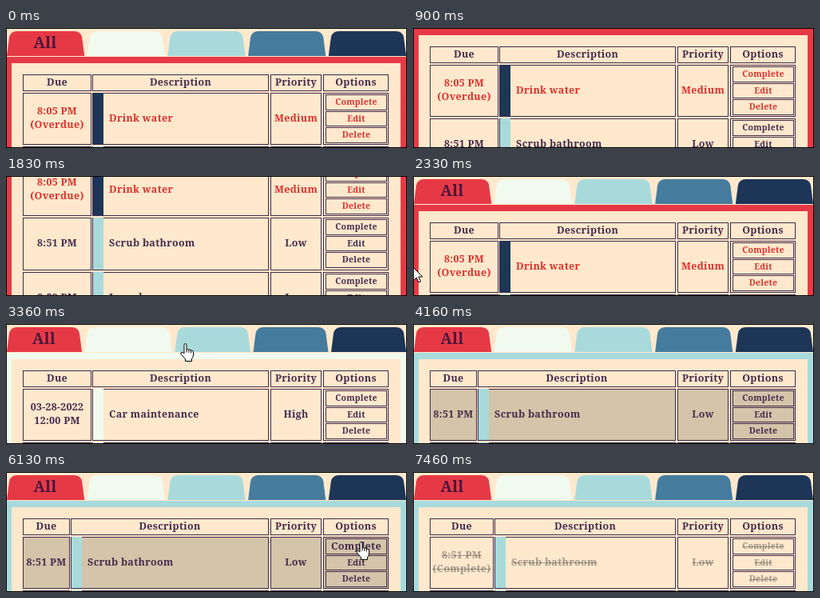
These frames come from a looping animation (502 by 150 pixels, 8.96 s). An HTML page with a canvas:

```html
<!DOCTYPE html>
<html lang="en">
<head>
<meta charset="utf-8">
<title>Task list</title>
<style>
  html, body { margin: 0; width: 100%; height: 100%; overflow: hidden; }
  canvas { display: block; }
</style>
</head>
<body>
<canvas id="stage" width="502" height="150"></canvas>
<script>
const g = document.getElementById('stage').getContext('2d');
const LOOP = 8960, FRAME = 100 / 3;
const FONT = '"Noto Serif", "Liberation Serif", serif';
const RED = '#e63946', MINT = '#f1faee', AQUA = '#a8dadc', STEEL = '#457b9d', NAVY = '#1d3557';
const TABS = [RED, MINT, AQUA, STEEL, NAVY];
const PAPER = '#ffe8cc', TAN = '#d4c4a9', INK = '#432a4c', LATE = '#df302c', DONE = 'rgba(72,72,72,.5)';
const ROW_TOP = 80.8, ROW_H = 65.6, PITCH = 67.6, SCROLL = 192;

const drink = { due: ['8:05 PM', '(Overdue)'], name: 'Drink water', level: 'Medium', tag: NAVY, ink: LATE };
const scrub = { due: ['8:51 PM'], name: 'Scrub bathroom', level: 'Low', tag: AQUA, ink: INK };
const scrubDone = { ...scrub, due: ['8:51 PM', '(Complete)'], ink: DONE, struck: true };
const laundry = { due: ['8:59 PM'], name: 'Laundry', level: 'Low', tag: AQUA, ink: INK };
const car = { due: ['03-28-2022', '12:00 PM'], name: 'Car maintenance', level: 'High', tag: MINT, ink: INK };

// Pointer path: time, x, y
const PATH = [
  [2300, -14, 117], [2333, 0, 114], [2430, 45, 88], [2560, 110, 45], [2733, 152, 22],
  [3200, 152, 22], [3366, 224, 24], [3533, 250, 26], [3733, 250, 26], [3800, 251, 35],
  [4133, 262, 152], [4533, 215, 152], [4700, 225, 138], [5433, 436, 131], [5900, 443, 88],
  [6100, 443, 88], [6133, 444, 87], [6433, 444, 87], [6667, 448, 100], [7233, 448, 100],
  [7460, 510, 104]
];
const ROW_HOVER = [[2395, 2465], [3925, 4230], [4560, 7400]];
const BUTTONS = [['Complete', 5737, 7333], ['Edit', 5515, 5737], ['Delete', 5305, 5515]];

const clamp = v => Math.max(0, Math.min(1, v));
const ease = v => v * v * (3 - 2 * v);
const ramp = (t, a, b) => ease(clamp((t - a) / (b - a)));
const hover = (t, a, b, d) => ramp(t, a, a + d) - ramp(t, b, b + d);

function rect(x, y, w, h, color) {
  g.fillStyle = color;
  g.fillRect(x, y, w, h);
}

// A bordered box whose edges snap to whole pixels
function cell(x, y, w, h, fill) {
  const top = Math.round(y), height = Math.round(y + h) - top;
  rect(x, top, w, height, INK);
  rect(x + 1, top + 1, w - 2, height - 2, fill);
}

function label(text, x, y, { size = 12.5, color = INK, align = 'center', struck = false } = {}) {
  g.font = `bold ${size}px ${FONT}`;
  g.letterSpacing = size * 0.024 + 'px';
  g.textAlign = align;
  g.fillStyle = color;
  g.fillText(text, x, Math.round(y + size * 0.33));
  if (struck) {
    const w = g.measureText(text).width;
    g.fillRect(align === 'left' ? x : x - w / 2, Math.round(y), w, 1);
  }
}

function drawTabs(t) {
  const grow = [0, hover(t, 2610, 3350, 150), hover(t, 3350, 3800, 150), 0, 0].map(v => 1 + 0.17 * v);
  const unit = 486 / grow.reduce((a, b) => a + b);
  let x = 1;
  TABS.forEach((color, i) => {
    const w = unit * grow[i], r = x + w;
    g.fillStyle = color;
    g.beginPath();
    g.moveTo(x, 35);
    g.lineTo(x + 3, 12);
    g.quadraticCurveTo(x + 4.5, 4, x + 13, 4);
    g.lineTo(r - 13, 4);
    g.quadraticCurveTo(r - 4.5, 4, r - 3, 12);
    g.lineTo(r, 35);
    g.fill();
    if (!i) label('All', x + w / 2 - 0.5, 19, { size: 19, color: '#45163c' });
    x = r + 3.5;
  });
}

function columns(dueW) {
  const desc = 21 + dueW + 1;
  return [[21, dueW], [desc, 329 - desc], [331, 64], [397, 82]];
}

function drawRow(task, y, cols, fill, t, active) {
  const mid = y + 31.7;
  const style = { color: task.ink, struck: task.struck };
  cols.forEach(([x, w]) => cell(x, y, w, ROW_H, fill));
  const [[dueX, dueW], [descX], [levelX, levelW]] = cols;
  task.due.forEach((line, i) =>
    label(line, dueX + dueW / 2, mid + (i - (task.due.length - 1) / 2) * 16.5, style));
  const top = Math.round(y);
  rect(descX + 1, top, 13, Math.round(y + ROW_H) - top - 1, task.tag);
  label(task.name, descX + 21, mid, { ...style, align: 'left' });
  label(task.level, levelX + levelW / 2, mid, style);
  BUTTONS.forEach(([text, from, to], i) => {
    const boxY = top + 2 + i * 20.5;
    const size = 10.5 + (active ? 2.1 * hover(t, from, to, 100) : 0);
    cell(400, boxY, 77, 19.6, fill);
    label(text, 438.5, boxY + 9.6, { ...style, size });
  });
}

function drawTable(t, tasks, dueW) {
  const cols = columns(dueW);
  ['Due', 'Description', 'Priority', 'Options'].forEach((head, i) => {
    const [x, w] = cols[i];
    cell(x, 58, w, 21, PAPER);
    label(head, x + w / 2, 68);
  });
  const hot = ROW_HOVER.some(([a, b]) => t >= a && t < b);
  tasks.forEach((task, i) =>
    drawRow(task, ROW_TOP + i * PITCH, cols, hot && !i ? TAN : PAPER, t, !i));
}

function pageAt(t) {
  if (t < 2999) return [RED, [drink, scrub, laundry, car], 86];
  if (t < 3730) return [MINT, [car, car], 86];
  return t < 6430 ? [AQUA, [scrub, laundry], 59] : [AQUA, [scrubDone, laundry], 80];
}

function pointerAt(t) {
  const i = PATH.findIndex(p => p[0] > t);
  if (i < 1) return PATH[i ? PATH.length - 1 : 0].slice(1);
  const [a, b] = [PATH[i - 1], PATH[i]];
  const k = (t - a[0]) / (b[0] - a[0]);
  return [1, 2].map(n => Math.round(a[n] + (b[n] - a[n]) * k));
}

const ARROW = new Path2D('M.5 .5V16.5L4.3 13L7 19L9.6 18L7 12H12Z');
const HAND = new Path2D('M5 13V2.5Q5 .5 6.5 .5T8 2.5V8Q9.5 6.8 10.8 8.3Q12.3 7.3 13.4 8.9' +
  'Q16.5 8.5 16.5 11V15Q16.5 17 14.5 19.5V22.5H6.5V20L1.2 13.8Q.2 11.6 2 11.3Q3.2 11.2 5 13Z');

function drawPointer(t) {
  const [x, y] = pointerAt(t);
  const hand = y < 35 || (x >= 399 && x < 477);
  const shape = hand ? HAND : ARROW;
  g.save();
  g.translate(hand ? x - 6 : x, y);
  g.fillStyle = '#fff';
  g.strokeStyle = '#000';
  g.lineWidth = 1;
  g.lineJoin = 'round';
  g.fill(shape);
  g.stroke(shape);
  if (hand) {
    g.beginPath();
    [[8, 8], [10.8, 8.3], [13.4, 8.9]].forEach(([fx, fy]) => {
      g.moveTo(fx, fy);
      g.lineTo(fx, fy + 3.5);
    });
    g.stroke();
  }
  g.restore();
}

function draw(now) {
  // The picture advances at 30 steps per second
  const t = Math.floor((now % LOOP + 7) / FRAME) * FRAME;
  const [color, tasks, dueW] = pageAt(t);
  const scroll = Math.round(SCROLL * (ramp(t, 800, 1166) - ramp(t, 1633, 2033)));
  rect(0, 0, 502, 150, PAPER);
  g.save();
  g.translate(0, -scroll);
  rect(1, 36, 500, 400, color);
  rect(7, 44, 487, 400, PAPER);
  drawTabs(t);
  drawTable(t, tasks, dueW);
  g.restore();
  drawPointer(t);
  g.strokeStyle = '#000';
  g.lineWidth = 1;
  g.strokeRect(0.5, 0.5, 501, 149);
}

const start = performance.now();
function tick() {
  draw(performance.now() - start);
  requestAnimationFrame(tick);
}
tick();
</script>
</body>
</html>
```
